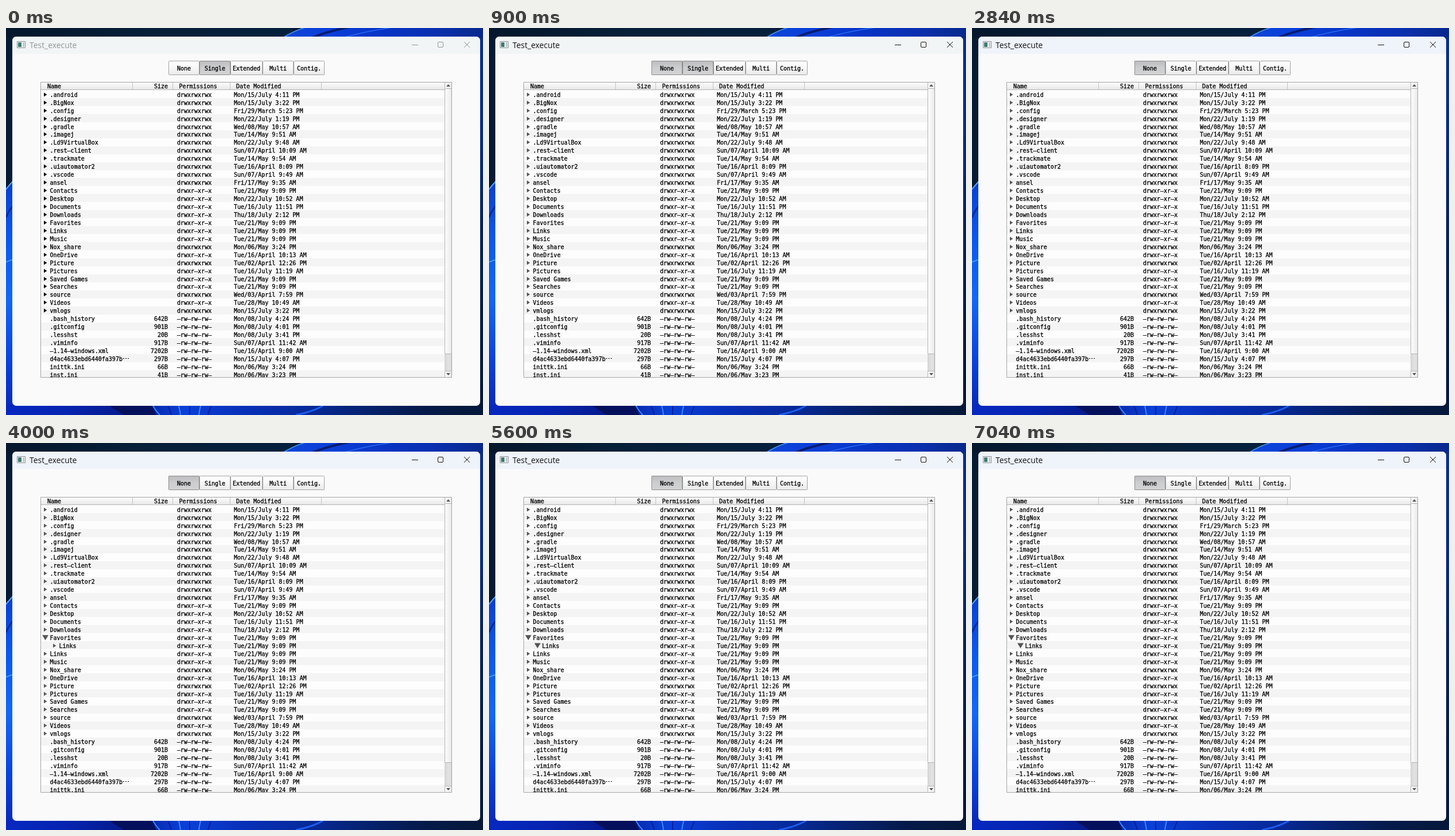
Animation, 831 px wide and 674 px high, one loop 8 s. Source, as an HTML page with a canvas:

```html
<!DOCTYPE html>
<html lang="en">
<head>
<meta charset="utf-8">
<title>Test_execute</title>
<style>
html, body { margin: 0; width: 100%; height: 100%; overflow: hidden; background: #051a38; }
canvas { display: block; }
</style>
</head>
<body>
<canvas id="stage" width="831" height="674"></canvas>
<script>
const ctx = document.getElementById('stage').getContext('2d');
const LOOP = 8000;
const ROW_TOP = 108.7, ROW_HEIGHT = 13.95;
const MONO = '10px "DejaVu Sans Mono", monospace';
const GREY = '#555';

const folders = `.android|w|Mon/15/July 4:11 PM
.BigNox|w|Mon/15/July 3:22 PM
.config|w|Fri/29/March 5:23 PM
.designer|w|Mon/22/July 1:19 PM
.gradle|w|Wed/08/May 10:57 AM
.imagej|w|Tue/14/May 9:51 AM
.Ld9VirtualBox|w|Mon/22/July 9:48 AM
.rest-client|w|Sun/07/April 10:09 AM
.trackmate|w|Tue/14/May 9:54 AM
.uiautomator2|w|Tue/16/April 8:09 PM
.vscode|w|Sun/07/April 9:49 AM
ansel|w|Fri/17/May 9:35 AM
Contacts|r|Tue/21/May 9:09 PM
Desktop|r|Mon/22/July 10:52 AM
Documents|r|Tue/16/July 11:51 PM
Downloads|r|Thu/18/July 2:12 PM
Favorites|r|Tue/21/May 9:09 PM
Links|r|Tue/21/May 9:09 PM
Music|r|Tue/21/May 9:09 PM
Nox_share|w|Mon/06/May 3:24 PM
OneDrive|r|Tue/16/April 10:13 AM
Picture|w|Tue/02/April 12:26 PM
Pictures|r|Tue/16/July 11:19 AM
Saved Games|r|Tue/21/May 9:09 PM
Searches|r|Tue/21/May 9:09 PM
source|w|Wed/03/April 7:59 PM
Videos|r|Tue/28/May 10:49 AM
vmlogs|w|Mon/15/July 3:22 PM`.split('\n').map(line => {
  const [name, access, date] = line.split('|');
  return { name, date, folder: true, perms: access === 'w' ? 'drwxrwxrwx' : 'drwxr-xr-x' };
});

const files = `.bash_history|642B|Mon/08/July 4:24 PM
.gitconfig|901B|Mon/08/July 4:01 PM
.lesshst|20B|Mon/08/July 3:41 PM
.viminfo|917B|Sun/07/April 11:42 AM
-1.14-windows.xml|7202B|Tue/16/April 9:00 AM
d4ac4633ebd6440fa397b⋯|297B|Mon/15/July 4:07 PM
inittk.ini|66B|Mon/06/May 3:24 PM
inst.ini|41B|Mon/06/May 3:23 PM`.split('\n').map(line => {
  const [name, size, date] = line.split('|');
  return { name, size, date, perms: '-rw-rw-rw-' };
});

const closedRows = [...folders, ...files];
const favorites = folders.findIndex(row => row.name === 'Favorites');
const openRows = [
  ...closedRows.slice(0, favorites + 1),
  { ...folders[favorites + 1], nested: true },
  ...closedRows.slice(favorites + 1)
];

function rect(x, y, w, h, fill) {
  ctx.fillStyle = fill;
  ctx.fillRect(x, y, w, h);
}

function frame(x, y, w, h, color, radius = 0) {
  ctx.strokeStyle = color;
  ctx.lineWidth = 1;
  ctx.beginPath();
  ctx.roundRect(x + .5, y + .5, w - 1, h - 1, radius);
  ctx.stroke();
}

function gradient(x0, y0, x1, y1, colors) {
  const g = ctx.createLinearGradient(x0, y0, x1, y1);
  colors.forEach((color, i) => g.addColorStop(i / (colors.length - 1), color));
  return g;
}

// Hyphens fill their whole cell, and a hairline stroke gives the strong bitmap look.
function label(text, x, y, align = 'left') {
  const shown = text.replace(/-/g, '–');
  ctx.font = MONO;
  ctx.textAlign = align;
  ctx.fillStyle = ctx.strokeStyle = '#000';
  ctx.lineWidth = .3;
  ctx.fillText(shown, x, y);
  ctx.strokeText(shown, x, y);
}

function polygon(color, ...points) {
  ctx.fillStyle = color;
  ctx.beginPath();
  points.forEach(([x, y]) => ctx.lineTo(x, y));
  ctx.fill();
}

function curve(color, width, x0, y0, cx, cy, x1, y1) {
  ctx.strokeStyle = color;
  ctx.lineWidth = width;
  ctx.beginPath();
  ctx.moveTo(x0, y0);
  ctx.quadraticCurveTo(cx, cy, x1, y1);
  ctx.stroke();
}

function drawWallpaper() {
  rect(0, 0, 831, 674, '#051a34');
  rect(0, 0, 500, 16, gradient(0, 0, 500, 0, ['#04172c', '#062039', '#05203c']));
  polygon(gradient(487, 0, 831, 0, ['#0d45d8', '#0a3ed8', '#0834c4', '#0a30b0', '#08288c']),
    [484, 16], [520, 0], [831, 0], [831, 16]);
  curve('#3a8cff', 2, 484, 16, 500, 6, 524, -2);
  curve('#051c70', 4, 535, 16, 560, 6, 600, -2);
  curve('#2a6cf4', 1.5, 590, 16, 625, 6, 680, -2);

  rect(0, 268, 12, 406, gradient(0, 268, 0, 674, ['#0a3fd0', '#0a58f0', '#1267f8', '#0a44e0', '#0726b4']));
  polygon('#051a34', [0, 262], [12, 262], [12, 266], [0, 281]);
  curve('#58a8ff', 2, 0, 281, 6, 273, 12, 267);
  curve('#062a9c', 3, 0, 330, 6, 316, 12, 310);
  curve('#3f9cff', 2, 0, 408, 7, 404, 12, 404);

  rect(0, 656, 831, 18, gradient(0, 0, 831, 0,
    ['#0728c0', '#0624b0', '#051a8c', '#0a40d8', '#0830b8', '#072a9c', '#062270', '#051a4a', '#05183a']));
  polygon('#04105c', [180, 658], [255, 658], [262, 674], [205, 674]);
  curve('#3c88ff', 2, 256, 658, 262, 668, 268, 674);
  for (let i = 0; i < 5; i++) {
    curve(i % 2 ? '#3f86f8' : '#0420a0', 2, 282 + i * 19, 658, 286 + i * 17, 666, 288 + i * 16, 674);
  }
  curve('#1c5ef0', 3, 505, 674, 535, 668, 552, 658);
  rect(825, 16, 6, 642, gradient(0, 16, 0, 658, ['#08308c', '#082d86', '#06245c', '#051e48', '#05183a']));
}

function drawTitleBar(active, settled) {
  ctx.save();
  ctx.beginPath();
  ctx.roundRect(11, 15, 815, 643, 7);
  ctx.fillStyle = '#fafafa';
  ctx.fill();
  ctx.clip();
  rect(11, 15, 815, 30, settled ? '#eff3fa' : '#f2f5f5');
  ctx.restore();

  rect(19, 23, 15, 12, '#f8f8f8');
  frame(19, 23, 15, 12, '#888c8e');
  rect(21, 25, 6, 8, gradient(0, 25, 0, 33, ['#4a7d86', '#347d68']));
  rect(29, 25, 3, 8, '#c4c8ca');

  const ink = active ? '#111' : '#949696';
  ctx.font = '13.9px "Open Sans", sans-serif';
  ctx.textAlign = 'left';
  ctx.fillStyle = ink;
  ctx.fillText('Test_execute', 41, 35);
  rect(707, 29, 11, 1, ink);
  frame(752, 24, 10, 10, ink, 1.5);
  curve(ink, 1, 798, 24, 803, 29, 808, 34);
  curve(ink, 1, 808, 24, 803, 29, 798, 34);
}

function drawButtons(pressed) {
  const edges = [283, 337, 391, 447, 501, 555];
  ['None', 'Single', 'Extended', 'Multi', 'Contig.'].forEach((text, i) => {
    const x = edges[i], w = edges[i + 1] - x;
    const down = pressed.includes(text);
    rect(x, 57, w, 25, down
      ? gradient(0, 57, 0, 82, ['#bcbcbe', '#cdced0', '#d2d2d4'])
      : gradient(0, 57, 0, 82, ['#ffffff', '#f7f7f7', '#e9e9e9']));
    frame(x, 57, w, 25, down ? '#8c8c8c' : '#a2a2a2', 1);
    label(text, x + w / 2, 74, 'center');
  });
}

function drawArrow(x, y, open, color) {
  if (open) polygon(color, [x - 5.5, y - 4.5], [x + 5.5, y - 4.5], [x, y + 4.5]);
  else polygon(color, [x - 2.5, y - 3.5], [x + 2.8, y], [x - 2.5, y + 3.5]);
}

function drawStripe(i) {
  rect(61, Math.round(ROW_TOP - .7 + i * ROW_HEIGHT), 703, 14, i % 2 ? '#f4f4f4' : '#fdfdfd');
}

function drawRow(row, i, arrowColor, openCount) {
  const y = Math.round(ROW_TOP + i * ROW_HEIGHT + 11);
  const indent = row.nested ? 16 : 0;
  if (row.folder) {
    const open = row.nested ? openCount > 1 : openCount > 0 && row.name === 'Favorites';
    drawArrow(68.5 + indent, y - 4, open, arrowColor);
  }
  const name = row.name.replace('⋯', '');
  label(name, 76.5 + indent, y);
  if (name !== row.name) {
    for (let dot = 0; dot < 3; dot++) rect(204 + dot * 4, y - 5, 2, 1, '#000');
  }
  if (row.size) label(row.size, 282, y, 'right');
  label(row.perms, 298, y);
  label(row.date, 397, y);
}

function drawScrollBar(thumbEnd) {
  rect(764, 94, 13, 515, gradient(764, 0, 777, 0, ['#d4d4d4', '#e2e2e2', '#dadada']));
  const face = gradient(764, 0, 777, 0, ['#fcfcfc', '#f4f4f4', '#e8e8e8']);
  [[94, 106], [105, thumbEnd], [597, 609]].forEach(([top, bottom]) => {
    rect(764, top, 13, bottom - top, face);
    frame(764, top, 13, bottom - top, '#b4b4b4');
  });
  polygon(GREY, [767, 102], [774, 102], [770.5, 98]);
  polygon(GREY, [767, 601], [774, 601], [770.5, 605]);
}

function drawTable(active, openCount) {
  ctx.save();
  ctx.beginPath();
  ctx.rect(60, 94, 717, 515);
  ctx.clip();
  rect(60, 94, 717, 515, '#fdfdfd');
  const rows = openCount ? openRows : closedRows;
  rows.forEach((row, i) => drawStripe(i));
  rows.forEach((row, i) => drawRow(row, i, active ? GREY : '#000', openCount));

  rect(60, 94, 704, 14, gradient(0, 94, 0, 108, ['#fcfcfc', '#f3f3f3', '#e5e5e5']));
  rect(60, 107, 704, 1, '#b4b4b4');
  [221, 291, 391, 550].forEach(x => rect(x - 1, 95, 1, 12, '#c2c2c2'));
  label('Name', 72, 105);
  label('Size', 282, 105, 'right');
  label('Permissions', 301.5, 105);
  label('Date Modified', 401, 105);
  drawScrollBar(openCount ? 557 : 568);
  ctx.restore();
  frame(60, 94, 717, 515, '#a4a4a4');
}

function render(time) {
  const active = time >= 900;
  const settled = time >= 1100;
  const openCount = time >= 5600 ? 2 : time >= 4000 ? 1 : 0;
  drawWallpaper();
  drawTitleBar(active, settled);
  drawButtons([active && 'None', !settled && 'Single']);
  drawTable(active, openCount);
}

const start = performance.now();
function tick() {
  render((performance.now() - start) % LOOP);
  requestAnimationFrame(tick);
}
tick();
</script>
</body>
</html>
```
